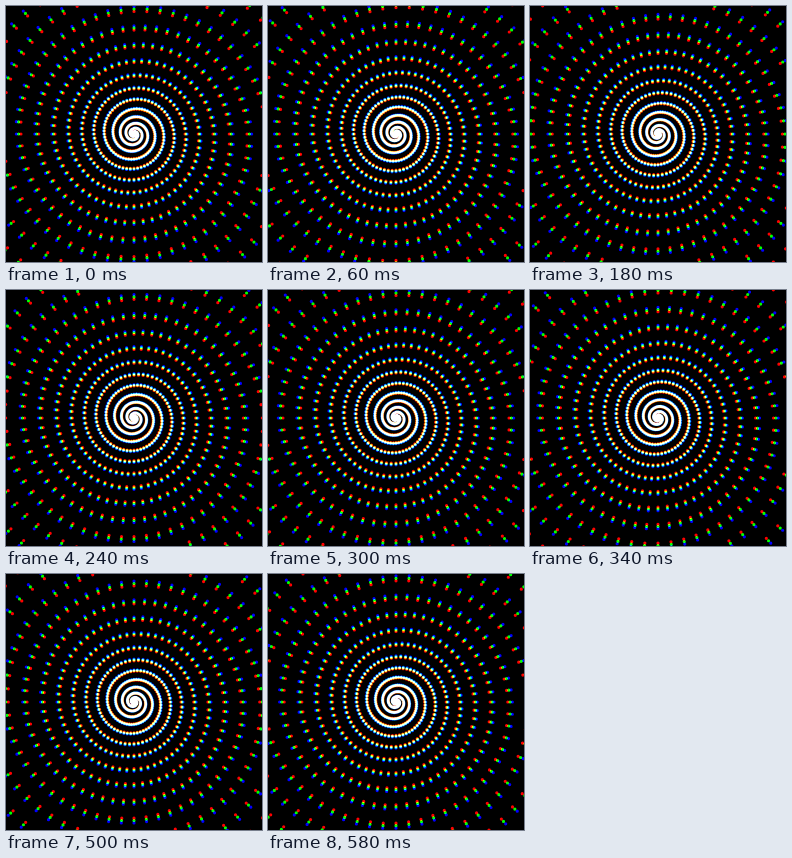
An HTML page with a canvas for the animation above (0.6 s loop, 256 by 256 pixels).

```html
<!DOCTYPE html>
<html>
<head>
<meta charset="utf-8">
<style>
html, body { margin: 0; height: 100%; overflow: hidden; background: #000; }
canvas { display: block; }
</style>
</head>
<body>
<canvas id="stage" width="256" height="256"></canvas>
<script>
const ctx = document.getElementById('stage').getContext('2d');
const TAU = Math.PI * 2;
const RAYS = 60, ARMS = 2, RINGS = 17, DOT = 1.6;
const PERIOD = 300, STEP = 20;
const CHANNELS = ['#f00', '#0f0', '#00f'];

// Dots travel outward on fixed rays; each ray lags, which forms the arms.
function drawSpiral(phase, scale) {
  ctx.beginPath();
  for (let ray = 0; ray < RAYS; ray++) {
    const turn = ray / RAYS;
    const angle = turn * TAU;
    const lag = (phase + ARMS * turn) % 1;
    for (let ring = 0; ring < RINGS; ring++) {
      const r = 0.775 * (ring + lag) ** 2 * scale;
      const x = 128 + r * Math.cos(angle), y = 128 + r * Math.sin(angle);
      ctx.moveTo(x + DOT, y);
      ctx.arc(x, y, DOT, 0, TAU);
    }
  }
  ctx.fill();
}

function frame(now) {
  const phase = Math.floor(now / STEP) * STEP / PERIOD + 0.2;
  ctx.globalCompositeOperation = 'source-over';
  ctx.fillStyle = '#000';
  ctx.fillRect(0, 0, 256, 256);
  ctx.globalCompositeOperation = 'lighter';
  CHANNELS.forEach((color, i) => {
    ctx.fillStyle = color;
    drawSpiral(phase, 1 + (i - 1) * 0.02);
  });
  requestAnimationFrame(frame);
}
requestAnimationFrame(frame);
</script>
</body>
</html>
```
